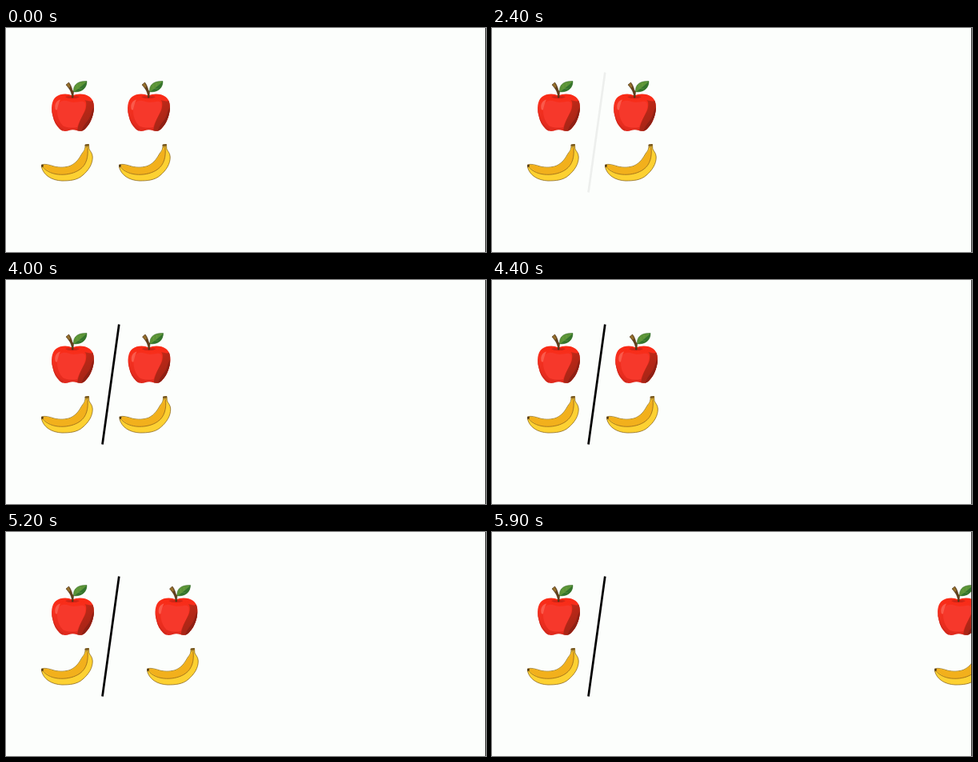
Write an HTML page that moves like this. It is 600x280 px and loops after 6000 ms.

```html
<!DOCTYPE html>
<html lang="en">
<head>
<meta charset="utf-8">
<title>Fruit pairs</title>
<style>
  html, body { margin: 0; width: 100%; height: 100%; overflow: hidden; background: #fcfefc; }
  svg { display: block; width: 600px; height: 280px; }
</style>
</head>
<body>
<svg viewBox="0 0 600 280">
  <defs>
    <linearGradient id="skin" x1="0" y1="0" x2="0" y2="1">
      <stop offset="0" stop-color="#f92a14"/>
      <stop offset="0.3" stop-color="#f6301f"/>
      <stop offset="1" stop-color="#e02a1e"/>
    </linearGradient>
    <linearGradient id="shade" x1="0" y1="0" x2="0.4" y2="1">
      <stop offset="0" stop-color="#d42a1a"/>
      <stop offset="0.4" stop-color="#b92817"/>
      <stop offset="1" stop-color="#a42416"/>
    </linearGradient>
    <path id="body" d="M83 84.500C77 81.500 68 81.800 62.500 86C56.500 91 56 101 58.500 110C60 117 63 122 67 126C70 129.500 75 129.500 79 128C82 127 85 127 88 128C92 129.500 96 129 99 126C104 121 107 115 109 107C111 98 110 90 104.500 86C99 81.800 89 81.500 83 84.500Z"/>
    <clipPath id="bodyClip"><use href="#body"/></clipPath>

    <g id="apple">
      <use href="#body" fill="url(#skin)"/>
      <g clip-path="url(#bodyClip)">
        <path d="M57 98C58 112 64 123 72 126L70 131L56 118Z" fill="#d3291c"/>
        <path d="M66 94C71 88 78 92 84 93C91 93 98 89 99 95C100 106 92 114 89 124C82 125 76 125 71 122C64 115 62 102 66 94Z" fill="#f6382b"/>
        <path d="M98 90C101 91 101 99 98 105C94 113 90 119 89 130H112V86C108 94 104 91 98 90Z" fill="url(#shade)"/>
        <path d="M110 99C106 104 107 110 102 116C98 121 96 124 94 130H112Z" fill="#8f2014"/>
        <path d="M74 86C78 89 88 89 92 86C89 84.500 86 84.500 83 86C80 84.500 77 84.500 74 86Z" fill="#cf2415"/>
      </g>
      <path d="M61.500 101C60.500 95 63 90.500 68 89.500C66 93 65 98 64 102C63 103 62 102.500 61.500 101Z" fill="#fa5a4b"/>
      <path d="M75 71L78.500 68C81 71 82 74 83 78L84.500 79L84 87H82.500C82.500 80 79 75.500 75 71Z" fill="#63401a" stroke="#41270f" stroke-width="0.5"/>
      <path d="M75.500 71L78.300 68.500L80.500 73L79 75Z" fill="#95702c"/>
      <path d="M84.500 79.800C83.500 70 91 66 101 66.500C101 75 95 80.500 84.500 79.800Z" fill="#5b9436" stroke="#34692a" stroke-width="0.5"/>
      <path d="M84.500 79.800C90 76 96 71 101 66.500C101 75 95 80.500 84.500 79.800Z" fill="#34742c"/>
      <path d="M85 79.500C90 76 95 72 100 67.500M89 76V71M93 73V69M90 75.500L95 76" fill="none" stroke="#7aa94f" stroke-width="0.4"/>
    </g>

    <g id="banana" stroke-linejoin="round">
      <path d="M44.500 171C48 169.500 54 171 60 173C67 174.800 75 174.500 81 172C89 168 92 162 95 157C97.500 153.500 99.200 152 99 146L103.500 145.500L103.800 151C105 154 108 156 108.200 161C108.500 170 103 178 96 184C89 190.500 79 191 70 191C57 190.500 47 184 44.500 174Z" fill="#fdd132" stroke="#8d6a23" stroke-width="0.8"/>
      <path d="M45.500 171.500C48 170 54 171.500 60 173.500C67 175.300 75 175 81 172.500C89 168.500 92.500 162.500 95.500 157.500C98 154 99.500 153 100 150H102C103 160 101 171 92 177C81 185 56 187 45.500 171.500Z" fill="#f2b01c"/>
      <path d="M102 150C103 160 101 171 92 177C81 185 56 187 45.500 173" fill="none" stroke="#94641a" stroke-width="0.8"/>
      <path d="M99 149.500V146L103.500 145.500V149.500Z" fill="#b58c2a"/>
      <path d="M98.700 147.300V145.700L103.500 145.200V147Z" fill="#65481a"/>
      <path d="M44.200 170.800L47 171.200L46.500 173.500L44.500 174Z" fill="#4f3818"/>
    </g>
  </defs>

  <use href="#apple"/>
  <use href="#banana"/>
  <path id="slash" d="M141.300 55.500L120.500 205.500" stroke="#000" stroke-width="2.7" opacity="0"/>
  <use id="rightApple" href="#apple" transform="translate(95 0)"/>
  <use id="rightBanana" href="#banana" transform="translate(97 0)"/>
  <path d="M599.500 0V280" stroke="#303230"/>
</svg>
<script>
  const LOOP = 6000, STEP = 100;
  const FADE_START = 2100, FADE_TIME = 1800;
  const $ = id => document.getElementById(id);
  const slash = $('slash');
  const movers = [
    { el: $('rightApple'), x: 95, travel: 405 },
    { el: $('rightBanana'), x: 97, travel: 412 }
  ];

  const easeInOut = p => p < 0.5 ? 2 * p * p : 1 - 2 * (1 - p) ** 2;
  const clamp = p => Math.min(1, Math.max(0, p));

  function draw(t) {
    slash.setAttribute('opacity', easeInOut(clamp((t - FADE_START) / FADE_TIME)));
    // exponential acceleration, reaching full travel on the last step
    const push = Math.exp(3.52 * (t - LOOP + STEP) / 1000);
    for (const { el, x, travel } of movers) {
      el.setAttribute('transform', `translate(${x + travel * push} 0)`);
    }
  }

  const start = performance.now();
  function tick() {
    const t = (performance.now() - start) % LOOP;
    draw(Math.floor(t / STEP) * STEP);
    requestAnimationFrame(tick);
  }
  tick();
</script>
</body>
</html>
```
